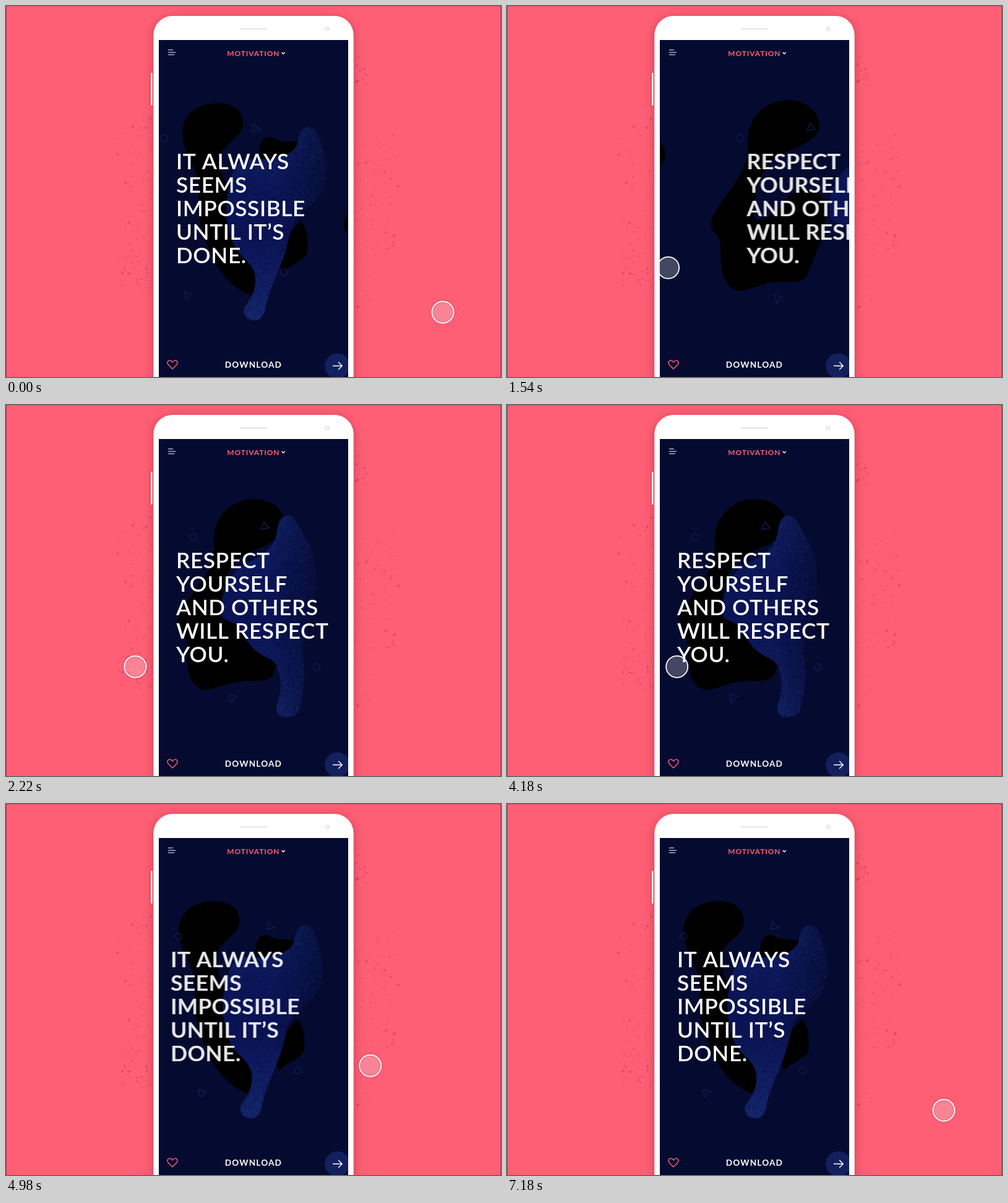
An HTML page with a canvas for the animation above (7.2 s loop, 800 px wide and 600 px high).

```html
<!DOCTYPE html>
<html lang="en">
<head>
<meta charset="utf-8">
<title>Daily quotes</title>
<style>
html, body { margin: 0; width: 100%; height: 100%; overflow: hidden; background: #ff5f74; }
canvas { display: block; width: 800px; height: 600px; }
</style>
</head>
<body>
<canvas id="stage" width="800" height="600"></canvas>
<script>
const W = 800, H = 600, LOOP = 7200;
const ctx = document.getElementById('stage').getContext('2d');
const PINK = '#ff5f74', NAVY = '#050b30', FONT = 'Lato, "Open Sans", sans-serif';

const pages = [
  {
    lines: ['IT ALWAYS', 'SEEMS', 'IMPOSSIBLE', 'UNTIL IT’S', 'DONE.'],
    black: [
      'M285 205C285 175 310 157 343 157C370 157 384 172 383 192C380 215 350 222 346 245C343 275 365 300 380 340L400 400L404 440L400 469C370 462 340 430 325 385C305 350 316 310 308 275C300 245 286 235 285 205Z',
      'M410 248C406 225 414 210 428 212C445 221 455 220 480 219C500 222 502 245 490 256L440 262Z',
      'M476 348C491 362 488 390 487 400C478 415 455 420 448 432L430 400Z'
    ],
    blue: 'M472 218C474 202 482 195 491 196C502 197 503 208 509 222C517 240 519 262 516 280C512 312 494 318 476 335C458 352 458 382 449 405C439 435 426 455 419 490C416 505 408 509 399 508C386 506 381 496 386 487C394 475 405 460 403 440C402 415 380 410 368 386C356 355 352 325 361 288C367 262 376 248 392 248C425 250 468 246 472 218Z',
    box: [352, 195, 168, 314],
    rings: [[285, 214], [478, 431]],
    triangles: [[433, 198, -4, -7, 7, 2, -6, 5], [322, 467, -5, -5, 7, -2, -2, 7]],
    // offsets: before the first swipe, after it, and where the return starts and ends
    shift: { black: [0, -300, -303, 0], blue: [0, -357, -303, 0], icons: [-29, -320, -317, 0], text: [0, -463, -463, 0] }
  },
  {
    lines: ['RESPECT', 'YOURSELF', 'AND OTHERS', 'WILL RESPECT', 'YOU.'],
    black: [
      'M336 225C332 190 358 152 400 152C430 152 453 172 452 195C448 225 400 230 375 250C352 270 348 310 346 340C350 355 380 340 400 310C420 290 450 290 462 320C466 370 445 400 434 430C430 448 410 447 390 446C360 447 340 460 323 461C300 458 292 435 292 400C293 380 290 372 280 365C272 355 277 345 285 330C310 290 338 265 336 225Z'
    ],
    blue: 'M438 205C440 185 447 178 456 179C468 181 474 200 483 215C500 235 502 270 500 300C498 340 478 370 479 400C485 440 480 470 473 495C468 506 448 507 440 501C433 490 443 475 444 455C443 432 440 418 425 410C397 399 388 378 376 360C369 350 358 350 352 345C346 328 350 285 378 262C402 248 432 240 438 205Z',
    box: [346, 178, 156, 328],
    rings: [[303, 214], [502, 424]],
    triangles: [[418, 195, -1, -6, 7, 4, -6, 6], [366, 474, -6, -7, 6, -3, -3, 7]],
    shift: { black: [270, 0, 0, 301], blue: [705, 0, 0, 301], icons: [299, 0, 0, 301], text: [463, 0, 0, 301] }
  }
];

const mix = (a, b, p) => a + (b - a) * p;
const span = (t, from, to) => Math.min(1, Math.max(0, (t - from) / (to - from)));
const smooth = u => u * u * (3 - 2 * u);

// cubic-bezier(.33, 0, .33, 1)
function glide(u) {
  let lo = 0, hi = 1;
  for (let i = 0; i < 24; i++) {
    const s = (lo + hi) / 2;
    if (.99 * s * (1 - s) + s * s * s < u) lo = s; else hi = s;
  }
  return smooth((lo + hi) / 2);
}

function bezier(a, b, c, d, s) {
  const r = 1 - s;
  return a * r * r * r + 3 * b * s * r * r + 3 * c * s * s * r + d * s * s * s;
}

function seeded(seed) {
  return () => {
    seed = (seed * 1664525 + 1013904223) >>> 0;
    return seed / 4294967296;
  };
}

function layer(draw) {
  const c = document.createElement('canvas');
  c.width = W;
  c.height = H;
  draw(c.getContext('2d'));
  return c;
}

function dot(g, x, y, r) {
  g.beginPath();
  g.arc(x, y, r, 0, 7);
  g.fill();
}

function line(g, color, width, ...pts) {
  g.strokeStyle = color;
  g.lineWidth = width;
  g.beginPath();
  for (let i = 0; i < pts.length; i += 2) g.lineTo(pts[i], pts[i + 1]);
  g.stroke();
}

function ramp(g, x0, y0, x1, y1, stops) {
  const grad = g.createLinearGradient(x0, y0, x1, y1);
  stops.forEach(([at, color]) => grad.addColorStop(at, color));
  return grad;
}

function label(g, text, x, y, size, weight, spacing, color) {
  g.font = `${weight} ${size}px ${FONT}`;
  g.letterSpacing = spacing + 'px';
  g.fillStyle = color;
  g.fillText(text, x, y);
}

function drawBlue(g, page, seed) {
  const [x, y, w, h] = page.box, rnd = seeded(seed);
  g.clip(new Path2D(page.blue));
  g.fillStyle = ramp(g, 0, y, 0, y + h, [[0, '#12236a'], [.3, '#0b1658'], [.55, '#0a1354'], [1, '#14256a']]);
  g.fillRect(x, y, w, h);
  g.fillStyle = ramp(g, x + w * .5, 0, x + w, 0, [[0, 'rgba(5,11,48,0)'], [1, 'rgba(5,11,48,.8)']]);
  g.fillRect(x, y, w, h);
  for (let i = 0; i < 4200; i++) {
    const px = rnd(), py = rnd(), a = .2 + rnd() * .5;
    const edge = .25 + .75 * Math.min(1, Math.max(px, Math.abs(py - .45) * 1.8));
    g.fillStyle = rnd() < .6 ? `rgba(5,11,48,${a * edge})` : `rgba(28,50,132,${a * edge * .8})`;
    dot(g, x + px * w, y + py * h, .5 + rnd() * .8);
  }
}

function drawIcons(g, page) {
  g.strokeStyle = '#111e5a';
  g.lineWidth = 1.3;
  for (const [x, y] of page.rings) {
    g.beginPath();
    g.arc(x, y, 5.5, 0, 7);
    g.stroke();
  }
  for (const [x, y, ...v] of page.triangles) {
    g.beginPath();
    for (let i = 0; i < 6; i += 2) g.lineTo(x + v[i], y + v[i + 1]);
    g.closePath();
    g.stroke();
  }
}

function drawSpeckles(g) {
  const rnd = seeded(41);
  const scatter = (n, x, w, y, h) => {
    for (let i = 0; i < n; i++) {
      const far = Math.pow(rnd(), 1.1), v = rnd();
      g.fillStyle = `rgba(176,52,80,${.2 + rnd() * .4})`;
      dot(g, x + w * far, y + h * v, .5 + rnd() * rnd() * 1.2);
    }
  };
  scatter(110, 236, -56, 180, 270);
  scatter(40, 236, -54, 395, 65);
  scatter(130, 563, 68, 205, 190);
  scatter(28, 563, 22, 82, 50);
  scatter(12, 563, 34, 400, 90);
  g.fillStyle = 'rgba(176,52,80,.55)';
  const big = [205, 195, 193, 286, 198, 350, 188, 432, 233, 182, 227, 197, 199, 433, 567, 96,
    579, 102, 568, 121, 634, 292, 628, 371, 569, 486, 582, 253, 614, 366];
  for (let i = 0; i < big.length; i += 2) dot(g, big[i], big[i + 1], 1.7);
}

const backdrop = layer(g => {
  g.fillStyle = PINK;
  g.fillRect(0, 0, W, H);
  drawSpeckles(g);
  g.fillStyle = 'rgba(80,25,45,.45)';
  g.fillRect(0, 0, 1, H);
  g.fillRect(W - 1, 0, 1, H);
  g.fillStyle = 'rgba(80,25,45,.15)';
  g.fillRect(0, 0, W, 1);

  g.shadowColor = 'rgba(90,10,35,.35)';
  g.shadowBlur = 16;
  g.shadowOffsetY = 3;
  g.fillStyle = '#fff';
  g.beginPath();
  g.roundRect(238.3, 16, 323.4, 640, 31);
  g.fill();
  g.shadowBlur = 3;
  g.shadowOffsetY = 0;
  g.beginPath();
  g.roundRect(234, 108, 2.5, 53, 1);
  g.fill();
  g.shadowColor = 'transparent';

  line(g, '#e4e4e6', 2, 378, 37, 422, 37);
  g.strokeStyle = '#dedee0';
  g.lineWidth = 1.5;
  g.beginPath();
  g.arc(519.3, 37, 2.6, 0, 7);
  g.stroke();
  g.fillStyle = NAVY;
  g.fillRect(247, 55, 306, 545);
});

const controls = layer(g => {
  g.lineCap = g.lineJoin = 'round';
  const bar = '#a6abc4';
  line(g, bar, 1.4, 262.5, 71, 269.5, 71);
  line(g, bar, 1.4, 262.5, 75, 273.5, 75);
  line(g, bar, 1.4, 262.5, 78.7, 271.5, 78.7);
  label(g, 'MOTIVATION', 357.3, 81, 11.9, 700, .95, PINK);
  line(g, '#fff', 1.4, 446, 75.3, 448.2, 77.4, 450.4, 75.3);

  g.strokeStyle = PINK;
  g.lineWidth = 1.4;
  g.stroke(new Path2D('M269 587L262.6 580.6C259 576.5 262 572.4 265.5 573.3Q268 574 269 576.3Q270 574 272.5 573.3C276 572.4 279 576.5 275.4 580.6Z'));
  label(g, 'DOWNLOAD', 353.8, 585, 13.6, 700, 1.15, '#fff');

  g.beginPath();
  g.rect(247, 55, 306, 545);
  g.clip();
  g.fillStyle = '#13205e';
  dot(g, 535.5, 582, 20.3);
  line(g, '#fff', 1.4, 528.5, 582, 543, 582);
  line(g, '#fff', 1.4, 537.5, 576.3, 543.2, 582, 537.5, 587.7);
});

pages.forEach((page, i) => {
  page.art = {
    black: layer(g => page.black.forEach(d => g.fill(new Path2D(d)))),
    blue: layer(g => drawBlue(g, page, 7 + i)),
    icons: layer(g => drawIcons(g, page))
  };
});

function offset(page, name, t) {
  const [start, away, from, to] = page.shift[name];
  if (t < 3600) return mix(start, away, glide(span(t, 780, name === 'black' ? 2120 : 2220)));
  return mix(from, to, smooth(span(t, 4320, 5040)));
}

function drawText(page, t) {
  const x = offset(page, 'text', t);
  const smear = x - offset(page, 'text', Math.max(0, t - 5));
  const copies = Math.abs(smear) > .4 ? 5 : 1;
  ctx.globalAlpha = copies > 1 ? .38 : 1;
  for (let i = 0; i < copies; i++) {
    const dx = copies > 1 ? smear * (i / (copies - 1) - .5) : 0;
    page.lines.forEach((s, n) => label(ctx, s, 275 + x + dx, 264 + 38 * n, 35.2, 600, .6, '#fff'));
  }
  ctx.globalAlpha = 1;
}

function pointer(t) {
  if (t < 3500) {
    const near = smooth(span(t, 0, 834)), drag = glide(span(t, 780, 2220));
    return [706 - 285 * near - 212 * drag, 495.3 - 72 * near];
  }
  if (t < 6260) {
    const near = smooth(span(t, 3580, 4280)), drag = glide(span(t, 4340, 5040));
    return [209 + 69.5 * near + 312 * drag, 423.3];
  }
  const s = smooth(span(t, 6260, 7180));
  return [bezier(590.5, 640, 726, 706, s), bezier(423.3, 424, 480, 495.3, s)];
}

function drawPointer(t) {
  const [x, y] = pointer(t);
  ctx.fillStyle = 'rgba(232,232,236,.27)';
  dot(ctx, x, y, 17.5);
  ctx.save();
  ctx.shadowColor = 'rgba(60,10,30,.25)';
  ctx.shadowBlur = 3;
  ctx.strokeStyle = '#fff';
  ctx.lineWidth = 1.8;
  ctx.beginPath();
  ctx.arc(x, y, 17.5, 0, 7);
  ctx.stroke();
  ctx.restore();
}

function render(t) {
  ctx.drawImage(backdrop, 0, 0);
  ctx.save();
  ctx.beginPath();
  ctx.rect(247, 55, 306, 545);
  ctx.clip();
  for (const page of pages) {
    for (const name in page.art) ctx.drawImage(page.art[name], offset(page, name, t), 0);
    drawText(page, t);
  }
  ctx.restore();
  ctx.drawImage(controls, 0, 0);
  drawPointer(t);
}

const begin = performance.now();
function tick() {
  render((performance.now() - begin) % LOOP);
  requestAnimationFrame(tick);
}
tick();
</script>
</body>
</html>
```
